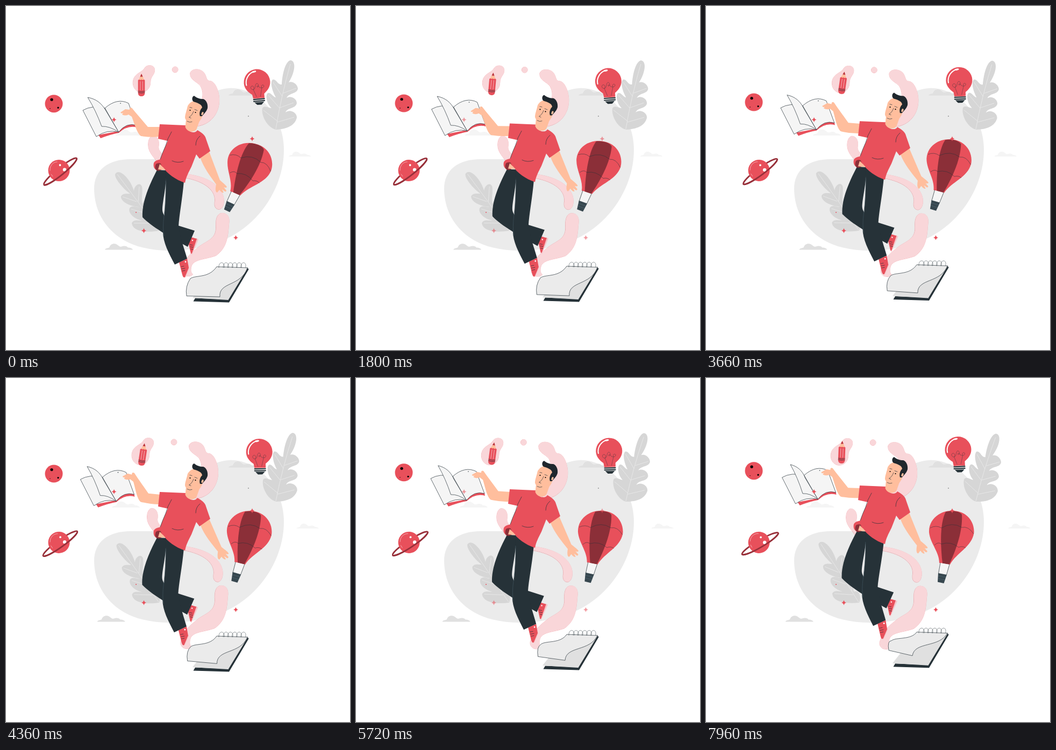
Recreate the animation shown at these times as an HTML page. Size 640 by 640 pixels, loop 8 s.

```html
<!DOCTYPE html>
<html lang="en">
<head>
<meta charset="utf-8">
<title>Floating imagination</title>
<style>
  html, body { margin: 0; width: 100%; height: 100%; overflow: hidden; background: #fff; }
  svg { display: block; width: 100%; height: 100%; }
  .red { fill: #e8505b; }
  .deep { fill: #8b2f38; }
  .dark { fill: #263238; }
  .skin { fill: #ffbe9d; }
  .leaf { fill: #d6d6d6; }
  .pale { fill: #f5f5f5; }
  .cloud { fill: #e0e0e0; }
  .paper { fill: #f5f5f5; stroke: #263238; stroke-width: .7; stroke-linejoin: round; }
  .line { fill: none; stroke: #263238; stroke-width: .7; stroke-linecap: round; }
  .fine { fill: none; stroke: #263238; stroke-width: .5; }
  .vein { fill: none; stroke: #ebebeb; stroke-width: .8; }
  .ring { fill: none; stroke: #98303a; stroke-width: 2.8; }
  .glow { fill: none; stroke: #fff; stroke-linecap: round; }
</style>
</head>
<body>
<svg viewBox="0 0 640 640" xmlns="http://www.w3.org/2000/svg">
  <defs>
    <path id="puff" d="M0 12C1 9 5 9 8 8C10 1 17-1 22 2C27 5 27 7 31 6C36 4 41 5 43 8C48 8 51 10 52 12Z"/>
    <path id="star" d="M0-4.8Q.8-.8 4.8 0Q.8 .8 0 4.8Q-.8 .8-4.8 0Q-.8-.8 0-4.8Z"/>
    <g id="trailShapes">
      <path d="M259 114C264 108 277 109 277 119C277 128 269 130 269 142C269 155 258 161 250 160C240 158 235 148 237 138C240 124 254 124 259 114Z"/>
      <circle cx="315" cy="118" r="5.4"/>
      <path d="M343 125C345 116 360 115 368 123C374 130 372 137 378 139C388 138 396 155 397 172C398 195 385 218 358 223L340 215C365 185 372 165 362 148C356 140 343 138 343 125Z"/>
      <path d="M274 241C284 242 286 253 284 262C284 270 292 276 300 283L285 297C282 285 265 275 265 258C265 248 269 241 274 241Z"/>
      <path d="M325 311C360 314 395 325 404 352C408 365 404 377 397 378C390 378 387 372 389 362C390 340 365 323 325 318Z"/>
      <path d="M403 385C412 385 417 392 415 405C413 428 412 449 391 464C372 471 352 470 346 482C343 490 344 496 348 499C344 503 338 503 333 501C327 497 326 491 329 485C335 465 350 455 360 447C375 436 392 433 391 410C390 395 394 385 403 385Z"/>
    </g>
  </defs>

  <path fill="#ebebeb" d="M415 153C460 150 517 195 517 268C517 330 480 395 420 428C360 460 270 465 220 436C180 413 164 375 164 340C164 305 190 285 232 285C275 284 320 292 338 250C350 215 350 158 415 153Z"/>

  <use href="#puff" class="cloud" x="414" y="154.500"/>
  <use href="#puff" class="cloud" id="cloudLeft"/>
  <use href="#puff" class="pale" id="cloudRight"/>
  <use href="#puff" class="pale" id="cloudBook"/>

  <g id="leafRight">
    <path class="leaf" d="M503 230C488 228 474 205 477 190C481 184 488 190 494 190C485 182 482 166 487 162C493 160 496 169 502 170C495 158 491 142 496 137C503 135 505 147 513 146C514 128 519 104 529 101C541 102 537 125 526 142C533 139 543 146 543 154C541 164 527 161 522 171C530 166 541 172 541 181C538 192 524 188 520 198C528 191 542 198 541 208C537 224 520 229 503 230Z"/>
    <path class="vein" d="M502 229Q511 172 529 108M505 214L479 194M509 190L488 166M514 168L497 142M505 216L536 207M510 189L535 180M516 162L540 153"/>
  </g>
  <g id="leafLeft">
    <path class="leaf" d="M285 418C262 422 236 420 234 404C238 396 247 400 253 399C240 397 226 386 230 376C235 369 243 376 248 374C232 373 213 365 214 354C218 347 226 350 231 349C220 342 202 322 203 313C210 300 232 322 238 344C238 335 249 326 253 336C255 348 251 360 254 368C259 355 268 352 273 362C275 378 270 390 274 398C283 394 289 406 285 418Z"/>
    <path class="vein" d="M284 417Q250 370 207 313M273 404L238 404M258 385L233 378M243 364L217 355M270 398L268 365M246 364L248 336"/>
  </g>

  <g id="trail">
    <use href="#trailShapes" fill="none" stroke="#e8505b" stroke-width=".6" opacity=".65" x="-.4" y=".4"/>
    <use href="#trailShapes" fill="#f9d6d9"/>
  </g>

  <g id="planet">
    <circle class="red" r="16.500"/>
    <circle cx="-4" cy="-7.500" r="2.600"/><circle cx="8" cy="7.500" r="1.600"/><circle cx="-7" cy="9" r=".7"/>
  </g>

  <g id="saturn">
    <ellipse class="ring" rx="39" ry="6.500" transform="translate(101 308)rotate(-39)"/>
    <circle class="red" cx="98.500" cy="306" r="20"/>
    <path class="glow" stroke-width=".7" opacity=".7" d="M82 306C81 297 88 290 95 290M84 313L87 317"/>
    <circle cx="100.500" cy="296" r="1.900" fill="#fff"/><circle cx="109" cy="304.500" r="3.200" fill="#fff"/>
    <path class="ring" transform="translate(101 308)rotate(-39)" d="M-39 0A39 6.500 0 0 0 39 0"/>
  </g>

  <g id="bulb">
    <path class="red" d="M-24.500 0A24.500 24.500 0 0 1 24.500 0C24.500 11 17 18 11.500 22V30H-9.500L-11 22C-18 17-24.500 10-24.500 0Z"/>
    <path class="glow" stroke-width="2" d="M-20 4C-22-7-15-16-7-19.500"/>
    <ellipse cx="-1" cy="-20.500" rx="4" ry="1.600" fill="#fff" transform="rotate(-8)"/>
    <path class="fine" opacity=".8" d="M-3 27L-8 13C-13 13-14 7-10 6C-6 6-6 11-8 13M-8 13C-3 12-5 4-1 2C3 2 3 9 0 9C-3 8 1 4 4 10C7 12 13 11 12 7C10 4 6 7 8 11L4 27"/>
    <path fill="#fff" d="M-10 30H12L10 38H-8Z"/>
    <path stroke="#263238" stroke-width="2.200" stroke-linecap="round" d="M-9 31.500H11M-9 35H11"/>
    <path class="dark" d="M-8 37H10L5 42H-3Z"/>
  </g>

  <g id="balloon">
    <path class="red" d="M457 247C485 246 500 268 498.500 288C495 314 466 325 454 347L434 344C434 323 417 308 415 287C414 263 435 247 457 247Z"/>
    <path class="deep" d="M446 249C456 246 472 247 476 254C478 285 465 320 452.500 347L440 345C436 310 435 270 446 249Z"/>
    <path class="fine" d="M417 279Q428 273 438 279Q458 267 476 278Q488 275 498 290M425 311Q432 304 438 309Q455 303 470 315Q477 312 483 316"/>
    <path class="pale" d="M436 344L453 347L448 366L433 363Z"/>
    <path class="line" d="M436 344L432.500 364M453 347L447.500 366"/>
    <path fill="#37474f" d="M432 363L448 366L442.500 382L431 379.500Z"/>
    <path fill="none" stroke="#607d8b" stroke-width=".4" d="M432 368L446 371M431.500 373L445 376"/>
  </g>

  <g id="book">
    <path class="red" d="M172 240L208 233Q226 217 243 221L244 226Q226 221 210 236Q194 239 176 246Z"/>
    <path class="paper" d="M143 194L168 243Q188 229 209.500 234.500L184 190Q160 184 143 194Z"/>
    <path class="paper" d="M209.500 234.500L184 190Q207 170 228 181L243 222Q224 216 209.500 234.500Z"/>
    <path class="paper" id="page"/>
    <circle cx="213" cy="181" r=".8" class="dark"/>
  </g>

  <g id="pencil">
    <path class="skin" d="M-6-9L0-22L6-9Z"/>
    <path fill="#b8323e" d="M-2.500-16.500L0-22L2.500-16.500Z"/>
    <path class="red" d="M-6.300-10Q-4-12-2-10Q0-12 2-10Q4-12 6.300-10V14Q6 20 0 20Q-6 20-6.300 14Z"/>
    <path fill="none" stroke="#f9d6d9" stroke-width=".7" d="M-2.200-8V9M2.200-8V9"/>
    <path class="line" d="M-6 10.500Q0 12.500 6 10.500M-6 13Q0 15 6 13"/>
  </g>

  <g id="notebook">
    <path class="dark" d="M449 486L451.500 490L415 551.500L348.500 549.500L352 543.500L413 546Z"/>
    <path class="cloud" d="M392 486L450 487L413.500 547L347 543Z"/>
    <path id="sheet" fill="#ebebeb" stroke="#263238" stroke-width=".7" stroke-linejoin="round"/>
    <path class="fine" id="rings"/>
  </g>

  <g id="man">
    <g id="legs">
      <path fill="#f6c4c8" d="M354 432L358 434L346 463L344 460Z"/>
      <path class="red" d="M339 440L344 430L355 433L346 460L344 461Z"/>
      <path class="line" d="M342 444L347 445M343 448L348 449M344 452L348 453"/>
      <circle cx="347" cy="436" r="1.200" fill="#fff"/>
      <path class="dark" d="M281 305C268 330 252 365 254 393C270 410 305 430 338 448L351 418L322 409C305 402 292 392 291 380C291 364 297 345 298 315L303 306Z"/>
      <path fill="#f6c4c8" d="M338 477L341 488L334 505L331 505Z"/>
      <path class="red" d="M322 477L337 470L340 487L333 504Q330 507 328 500Z"/>
      <path class="line" d="M326 485L331 484M327 489L333 488M328 493L333 492"/>
      <circle cx="334" cy="476" r="1.400" fill="#fff"/>
      <path class="dark" d="M296 304L331 325C328 360 322 390 321 410C325 435 332 452 337 470L314 481C303 460 292 440 292 420C294 392 300 348 296 304Z"/>
      <path fill="none" stroke="#455a64" stroke-width=".6" d="M297 325Q298 360 294 390Q291 415 294 428"/>
    </g>
    <path class="skin" id="armRight" d="M361 281L378 271L398 324C405 330 410 334 411 337Q409 339 405 337L410 343Q410 346 407 345L402 341L405 347Q402 349 397 342L393 347Q388 346 391 332C381 318 367 300 361 281Z"/>
    <path class="skin" id="armLeft" d="M287 225L264 225L241 198L234 189.500Q229 188 230 193L222 192L213 198Q214 201 218 199L216 202Q222 205 228 202L234 206C240 222 244 237 251 242Q270 245 287 243Z"/>
    <path class="red" d="M286 220L334 222C338 236 352 238 356 231C366 236 371 242 372 247L380 270L360 284L354 276L345 299C339 311 335 318 333 329C315 323 300 312 292 300C284 310 272 305 275 292C278 286 284 287 287 285C290 276 296 262 301 251L283 247Z"/>
    <path class="deep" d="M279 294Q283 291 288 293L290 304Q284 309 279 305Q276 300 279 294Z"/>
    <path class="skin" d="M286 294L297 305Q290 305 283 304Z"/>
    <path class="line" d="M309 288Q319 293 330 289M353 259Q353 248 361 242M308 234Q300 247 297 260Q291 273 287 285"/>
    <path class="skin" d="M335 211L333.500 225C337 236 352 236 355 228L363 205Z"/>
    <path class="skin" d="M338 186C342 179 348 176 354 177L367 186C370 200 363 212 357 218C348 219 335 217 333 208C333 202 336 195 338 186Z"/>
    <path fill="#1f272d" d="M350 167C346 168 345 175 349 178C355 180 364 182 365 189C361 193 359 199 361 205L364.500 205C367 202 373 197 375 190C376 183 373 175 367 173C360 173 355 171 350 167Z"/>
    <ellipse class="skin" cx="365.500" cy="200" rx="1.800" ry="3.200" transform="rotate(20 365.500 200)"/>
    <path class="line" d="M342 188.500L346 189.500M351 192.500L356 194.500M349 196Q346 204 340.500 207L344 208.500M337 214.500Q342 217.500 346 215.500"/>
    <circle cx="342.500" cy="194" r="1.100"/><circle cx="352.500" cy="198" r="1.100"/>
  </g>

  <g id="stars"></g>
  <circle class="red" cx="242" cy="384" r="1"/>
  <circle cx="451" cy="205" r=".8" fill="#555"/>
</svg>
<script>
const LOOP = 8000, STEP = 112;
const $ = id => document.getElementById(id);
const move = (id, x, y, more = '') => $(id).setAttribute('transform', `translate(${x} ${y})${more}`);
const turn = (id, angle, x, y) => $(id).setAttribute('transform', `rotate(${angle} ${x} ${y})`);
const lerp = (a, b, p) => a + (b - a) * p;

// Smooth curve through the values at unevenly spaced key times (seconds).
const TIMES = [0, 1.8, 2.92, 4.36, 5.72, 6.84, 7.96];
function curve(values, t) {
  const last = TIMES.length - 1;
  let i = 0;
  while (i < last - 1 && t > TIMES[i + 1]) i++;
  const slope = j => {
    const a = Math.max(j - 1, 0), b = Math.min(j + 1, last);
    return (values[b] - values[a]) / (TIMES[b] - TIMES[a]);
  };
  const h = TIMES[i + 1] - TIMES[i], u = (t - TIMES[i]) / h, v = 1 - u;
  return v * v * ((1 + 2 * u) * values[i] + u * h * slope(i))
       + u * u * ((1 + 2 * v) * values[i + 1] - v * h * slope(i + 1));
}

$('stars').innerHTML = [[201, 211.5], [256.5, 418], [458, 247], [427.5, 431]]
  .map(([x, y]) => `<use href="#star" class="red" x="${x}" y="${y}"/>`).join('');
$('rings').setAttribute('d', Array.from({ length: 6 }, (_, i) =>
  `M${396 + i * 8.2} 487C${395 + i * 8.2} 474 ${408 + i * 8.2} 475 ${406 + i * 7.9} 487`).join(''));

function draw(ms) {
  const t = Math.floor((ms % LOOP + 4) / STEP) * STEP / 1000;
  const ease = (1 - Math.cos(Math.PI * t / 11)) / 2;
  const sway = Math.sin(Math.PI * t / 8.7);
  const p = t / 7.96, fold = ease / .822;

  move('cloudLeft', 184 - 44 * ease, 441.5);
  move('cloudRight', 526 + 44 * ease, 270.5, 'scale(.8)');
  move('cloudBook', 204 - 21 * ease, 229);
  turn('leafRight', 5.6 * ease, 502, 230);
  turn('leafLeft', 4.2 * ease, 285, 418);
  move('trail', -4 * p, 1.8 * p);

  move('planet', 89, 181.7 - 11 * ease);
  turn('saturn', 10.3 * ease, 99, 306);
  move('bulb', 467 + curve([0, 2.4, 3.5, 4.2, 3.8, 3, 2], t), 142 - 8.5 * p,
    `rotate(${curve([-5, -3, -2, -1, -1.3, -2, -2.7], t)})`);
  move('balloon', curve([-3.2, -5, -5, -4, -2, -1, 0], t), curve([8, 4, 2, .3, 0, 0, 0], t),
    `rotate(${curve([14, 9.2, 7, 4.5, 2.2, .8, 0], t)} 457 285)`);
  move('pencil', 252 + 2.5 * sway, 148 - 9 * p, `rotate(${8.5 * sway})`);

  move('book', curve([0, -2.5, -3.5, -4.6, -4, -2.8, -1.5], t), curve([0, -2, -3.5, -5.5, -7, -8, -9], t));
  const tip = lerp(152, 158.5, p), corner = lerp(178, 181.5, p);
  $('page').setAttribute('d', `M${tip} 170C${lerp(168, 171, p)} 173 ${lerp(178, 181, p)} 181 186 195L209.5 234.5
    Q${lerp(192, 195, p)} 223 ${corner} 224Q${(tip + corner) / 2 + 2} 194 ${tip} 170Z`);

  move('notebook', 0, -15 * ease);
  const lx = lerp(336, 340, fold), ly = lerp(539.5, 519, fold);
  const rx = lerp(398, 384, fold), ry = lerp(541, 529, fold);
  $('sheet').setAttribute('d', `M392 485C${lerp(377, 382, fold)} ${lerp(507, 500, fold)} 354 ${lerp(500, 494, fold)}
    ${lerp(343, 345, fold)} ${lerp(507, 501, fold)}Q${lx - 3} ${ly - 18} ${lx} ${ly}L${rx} ${ry}
    C${lerp(395, 388, fold)} ${lerp(513, 502, fold)} ${lerp(438, 434, fold)} ${lerp(522, 515, fold)} 449 487Z`);

  move('man', 0, -24.3 * ease);
  turn('legs', 1.2 * ease, 305, 310);
  turn('armLeft', curve([0, .7, 3.5, 5.6, 3.9, 2.8, 2], t), 288, 234);
  turn('armRight', curve([0, -1.3, -2.2, -3, -2.7, -2, -1.3], t), 368, 268);

  const dim = Math.pow((1 - Math.cos(2 * Math.PI * t / 3.9)) / 2, 2);
  $('stars').setAttribute('opacity', 1 - .45 * dim);
}

const start = performance.now();
function tick(now) {
  draw(Math.max(0, now - start));
  requestAnimationFrame(tick);
}
draw(0);
requestAnimationFrame(tick);
</script>
</body>
</html>
```
